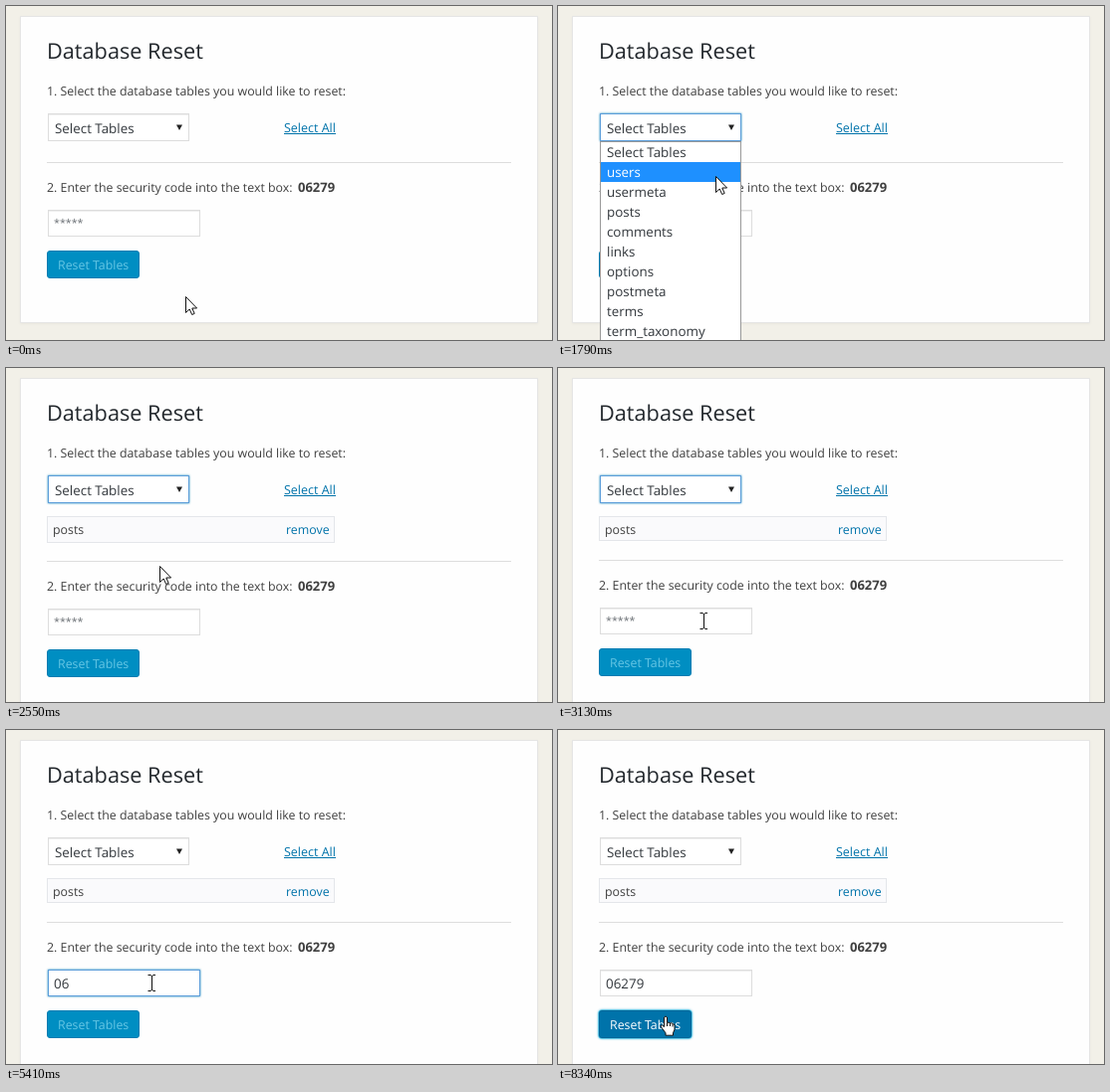
An HTML page for the animation above (9200 ms loop, 548x336 px).

```html
<!DOCTYPE html>
<html lang="en">
<head>
<meta charset="utf-8">
<title>Database Reset</title>
<style>
  html, body { margin: 0; width: 100%; height: 100%; overflow: hidden; background: #f2f0e8; }
  #stage { display: block; font: 12.36px "Open Sans", "Noto Sans", sans-serif; fill: #3f3f3f; text-rendering: geometricPrecision; }
  #panel { fill: #fefefe; stroke: #e5e5e5; filter: drop-shadow(0 1px 1px rgba(0, 0, 0, .04)); }
  .box { fill: #fff; stroke: #ddd; }
  .ring { fill: #fff; stroke: #5b9dd9; filter: drop-shadow(0 0 1px rgb(30, 140, 190)); }
  .inset { stroke: #eee; }
  .link { fill: #0073aa; }
  .field { font-size: 13.4px; fill: #32373c; }
  .cursor { stroke: #111; stroke-linejoin: round; fill: #fff; }
</style>
</head>
<body>
<svg id="stage" width="548" height="336" viewBox="0 0 548 336">
  <rect id="panel" x="14.5" y="10.5" width="519" height="308"/>
  <text x="41" y="53" font-size="21.7" fill="#23282d">Database Reset</text>
  <text x="41" y="90">1. Select the database tables you would like to reset:</text>

  <rect class="box" x="42.5" y="108.5" width="141" height="27"/>
  <path class="inset" d="M43 109.5h140"/>
  <rect class="ring" id="selectRing" x="42.5" y="108.5" width="141" height="27"/>
  <text class="field" x="49" y="128">Select Tables</text>
  <path d="M171 119.5h6l-3 5.5z" fill="#222"/>
  <text class="link" x="279" y="127" font-size="12.5">Select All</text>
  <path d="M279 128.5h52" stroke="#0073aa"/>

  <svg id="item" x="41" y="149" width="289" height="25">
    <rect id="itemBox" x=".5" y=".5" width="288" height="24" fill="#fafafc" stroke="#e4e6ea"/>
    <text x="6" y="18">posts</text>
    <text class="link" x="240" y="18">remove</text>
  </svg>

  <g id="lower">
    <path d="M41 157.5h466" stroke="#ddd"/>
    <text x="41" y="187">2. Enter the security code into the text box:</text>
    <text x="293" y="187" font-size="13" font-weight="bold">06279</text>
    <rect class="box" x="42.5" y="205.5" width="152" height="26"/>
    <path class="inset" d="M43 206.5h151"/>
    <rect class="ring" id="inputRing" x="42.5" y="205.5" width="152" height="26"/>
    <text id="stars" x="48" y="222" font-size="10.7" fill="#6a6f74">*****</text>
    <text class="field" id="code" x="48" y="223.5"></text>
    <rect id="caret" y="209" width="1" height="19" fill="#000"/>
    <rect id="glow" x="40.5" y="245.5" width="94" height="29" rx="3.5" fill="#33b3db" style="filter:drop-shadow(0 0 1px #33b3db)"/>
    <rect id="buttonEdge" x="41" y="247" width="93" height="28" rx="3" fill="#006799"/>
    <rect id="button" x="41.5" y="246.5" width="92" height="27" rx="2.5"/>
    <text id="buttonText" x="52" y="264.5">Reset Tables</text>
  </g>

  <g id="options"></g>
  <g id="history"></g>

  <path class="cursor" id="arrow" d="M.5 .5V16.5L4.2 13L6.7 18.5L9.2 17.4L6.8 12H11.6Z"/>
  <path class="cursor" id="beam" d="M-3.5-7.5h2.5l1.5 1l1.5-1h2M-3.5 8.5h2.5l1.5-1l1.5 1h2M.5-6.5v14" style="fill:none"/>
  <path class="cursor" id="hand" d="M-1.5 1q1.5-2 3 0v5.5q1.5-1 3 .5q1.7-.8 2.7 .7q1.6-.4 1.8 1.5v4l-1.5 3.6v2.4h-7.5v-2.4l-4.5-6q-.8-2 .7-2l2.3 1.8zM1.5 6.5v3.5M4.5 7v3M7 8v2.5"/>
</svg>
<script>
const LOOP = 9200;
const ROW = 20;
const TABLES = ["Select Tables", "users", "usermeta", "posts", "comments", "links",
  "options", "postmeta", "terms", "term_taxonomy"];
const KEY_TIMES = [4270, 4890, 5650, 6100, 6510];
const CARET_ON = [[3440, 4000], [4270, 4860], [4890, 5410], [5650, 7060], [7590, 8100]];
// start, end, from x, from y, to x, to y
const MOVES = [
  [310, 1000, 180, 292, 165, 126],
  [1510, 2000, 165, 126, 154, 199],
  [2640, 3130, 154, 199, 146, 254],
  [7410, 7860, 146, 254, 108, 288]
];

const el = {};
const set = (id, attrs) => {
  for (const name in attrs) el[id].setAttribute(name, attrs[name]);
};
const show = (id, visible) => set(id, { visibility: visible ? "visible" : "hidden" });
const ramp = (t, a, b) => Math.min(1, Math.max(0, (t - a) / (b - a)));
const swing = (t, a, b) => .5 - Math.cos(Math.PI * ramp(t, a, b)) / 2;
const within = (t, a, b) => t >= a && t < b;

document.getElementById("options").innerHTML =
  '<rect x="42.5" y="136.5" width="141" height="210" fill="#fff" stroke="#999"/>' +
  '<rect id="mark" x="43" width="140" height="20" fill="#1e90ff"/>' +
  TABLES.map((name, i) => `<text class="field" x="49" y="${151.5 + i * ROW}">${name}</text>`).join("");

document.getElementById("history").innerHTML =
  '<rect x="42.5" y="269.5" width="193" height="54" fill="#fff" stroke="#aaa"/>' +
  ["06279", "41853", "79320"].map((code, i) => `<text x="48" y="${283 + i * 18}">${code}</text>`).join("");

document.querySelectorAll("[id]").forEach(node => el[node.id] = node);
const optionTexts = [...el.options.querySelectorAll("text")];

function pointerAt(t) {
  let pos = [180, 292];
  for (const [a, b, x0, y0, x1, y1] of MOVES) {
    if (t < a) break;
    const k = swing(t, a, b);
    pos = [x0 + (x1 - x0) * k, y0 + (y1 - y0) * k];
  }
  return pos;
}

function pointerKind(x, y, shift, overList) {
  const v = y - shift;
  if (overList) return "arrow";
  if (x < 134 && within(v, 246, 274)) return "hand";
  if (within(v, 205, 233) || within(v, 175, 192)) return "beam";
  return "arrow";
}

function drawButton(t, hovered) {
  const enabled = t >= 6620, pressed = t >= 8310;
  const fill = pressed ? "#0073aa" : !enabled || hovered ? "#008ec2" : "#0085ba";
  set("button", { fill, stroke: pressed ? "#006799" : enabled ? "#0073aa" : "#007cb2" });
  set("buttonText", { fill: enabled ? "#fff" : "#66c6e4" });
  show("buttonEdge", enabled && !pressed);
  show("glow", pressed);
}

function draw(t) {
  // The new row slides open, overshoots slightly and settles.
  const opened = swing(t, 2340, 2440);
  const bounce = swing(t, 2440, 2540) - swing(t, 2540, 2640);
  const shift = t < 2340 ? 0 : Math.round(14 + 22 * opened + bounce);
  const itemHeight = Math.max(1, Math.round(25 * opened + 2 * bounce));

  set("panel", { height: 308 + shift });
  set("lower", { transform: `translate(0 ${shift})` });
  set("item", { height: itemHeight, opacity: opened });
  set("itemBox", { height: itemHeight - 1 });
  set("selectRing", { opacity: ramp(t, 1150, 1190) - ramp(t, 3440, 3500) });
  set("inputRing", { opacity: ramp(t, 3430, 3500) - ramp(t, 8300, 8340) });

  const typed = KEY_TIMES.filter(k => t >= k).length;
  el.code.textContent = "06279".slice(0, typed);
  show("stars", typed === 0);
  set("caret", { x: Math.round(48 + 7.6 * typed) });
  show("caret", CARET_ON.some(([a, b]) => within(t, a, b)));

  const [x, y] = pointerAt(t);
  const row = Math.max(0, Math.floor((y - 137) / ROW));
  show("options", within(t, 1240, 2340));
  set("mark", { y: 137 + row * ROW });
  optionTexts.forEach((text, i) => text.style.fill = i === row ? "#fff" : "");
  show("history", within(t, 3500, 4270));

  const kind = pointerKind(x, y, shift, within(t, 1000, 2640));
  drawButton(t, kind === "hand");
  for (const name of ["arrow", "beam", "hand"]) {
    show(name, name === kind);
    set(name, { transform: `translate(${Math.round(x)} ${Math.round(y)})` });
  }
}

const start = performance.now();
function tick() {
  draw((performance.now() - start) % LOOP);
  requestAnimationFrame(tick);
}
tick();
</script>
</body>
</html>
```
